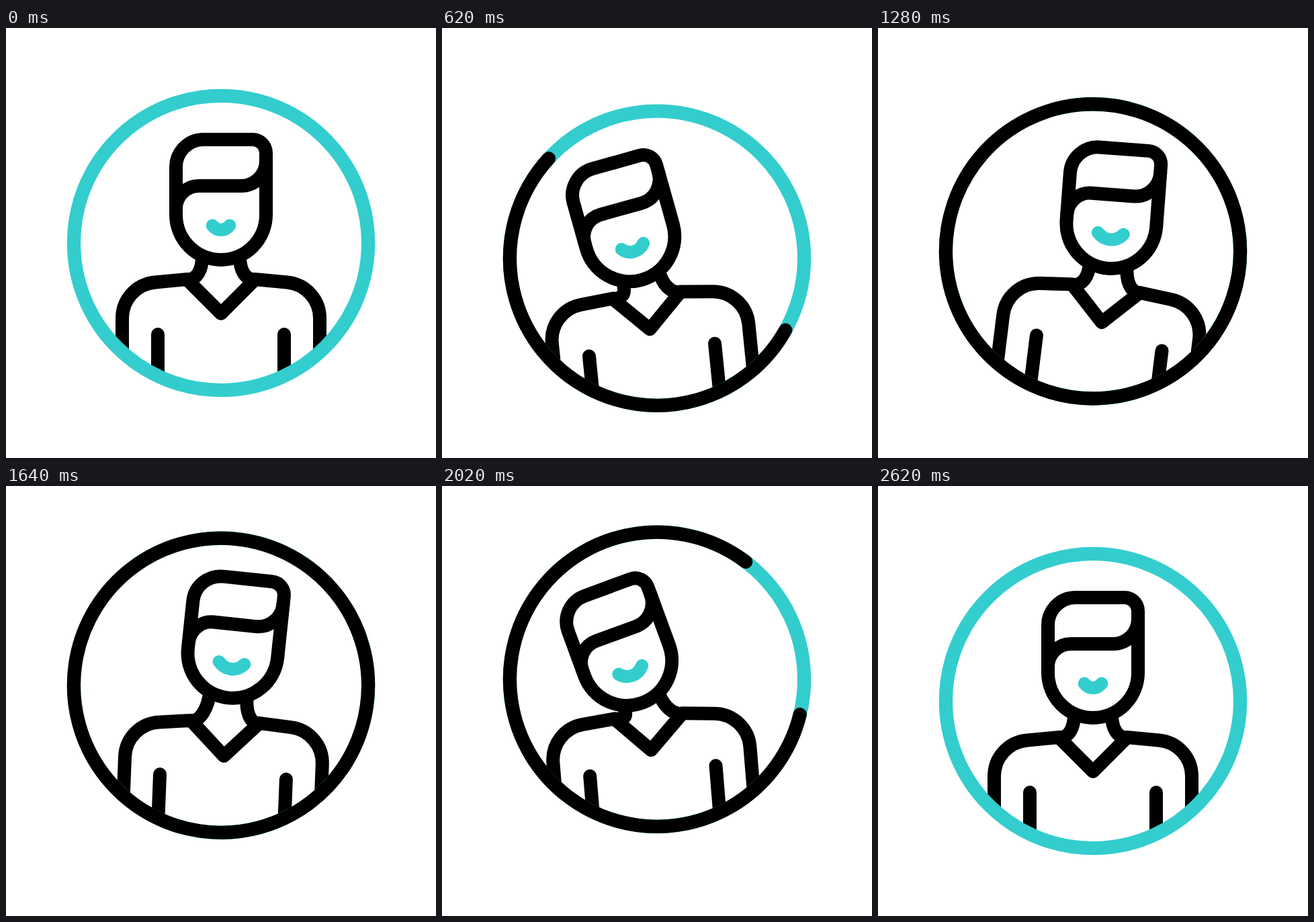
Recreate the animation shown at these times as an HTML page. Size 640x640 px, loop 3000 ms.

```html
<!DOCTYPE html>
<html lang="en">
<head>
<meta charset="utf-8">
<title>Avatar</title>
<style>
  html, body { margin: 0; width: 100%; height: 100%; overflow: hidden; background: #fff; }
  svg { display: block; width: 100vw; height: 100vh; }
  .line { fill: none; stroke: #000; stroke-width: 20; stroke-linecap: round; stroke-linejoin: round; }
  .ring { fill: none; stroke: #33cdce; stroke-width: 20.3; }
  #mouth { stroke: #33cdce; stroke-width: 19; }
  #trace { stroke: #000; stroke-linecap: round; }
</style>
</head>
<body>
<svg viewBox="0 0 640 640">
  <defs>
    <clipPath id="inside"><circle cx="320" cy="320" r="219"/></clipPath>
  </defs>
  <g id="all">
    <g clip-path="url(#inside)">
      <g id="body" class="line">
        <path d="M173 510V432C173 404 194 381 222 378.500L270 374"/>
        <path d="M467 510V432C467 404 446 381 418 378.500L370 374"/>
        <path d="M270 375L320 425L370 375"/>
        <path d="M226 456V550M414 456V550"/>
        <path id="neck"/>
        <g id="head">
          <path d="M253 278V207A41 41 0 0 1 294 166H367A20 20 0 0 1 387 186V278A67 67 0 0 1 253 278Z"/>
          <path d="M253 269A34 34 0 0 1 287 235H350A37 37 0 0 0 387 198"/>
          <path id="mouth"/>
        </g>
      </g>
    </g>
    <circle class="ring" cx="320" cy="320" r="219.100"/>
    <circle id="trace" class="ring" cx="320" cy="320" r="219.100" pathLength="360"/>
  </g>
</svg>
<script>
const LOOP = 3000, STEP = 20;
const $ = id => document.getElementById(id);
const set = (id, name, value) => $(id).setAttribute(name, value);

function ease(t, from, to) {
  const p = Math.min(1, Math.max(0, (t - from) / (to - from)));
  return p * p * (3 - 2 * p);
}

// Eased value through the given times, starting and ending at rest
function track(t, times, values) {
  let v = values[0];
  for (let i = 1; i < times.length; i++) {
    v += (values[i] - values[i - 1]) * ease(t, times[i - 1], times[i]);
  }
  return v;
}

const SHIFT = [200, 900, 1900, 2600];
const SWAY = [200, 800, 1300, 2080, 2600];
const NOD = [200, 900, 1560, 2060, 2600];

function neckSide(side, headPoint) {
  const [x0, y0] = headPoint(side * 28, 62);
  const [x1, y1] = headPoint(side * 28, 83);
  return `M${x0} ${y0}C${x1} ${y1} ${320 + side * 36} 374 ${320 + side * 50} 375`;
}

function draw(t) {
  set('all', 'transform', `translate(0 ${track(t, SHIFT, [0, 35, -35, 0])})`);
  set('body', 'transform', `rotate(${track(t, SWAY, [0, -7.3, 7.1, -4.9, 0])} 320 531)`);

  const tilt = track(t, NOD, [0, -15.3, 5.2, -15.8, 0]);
  const hx = 320 + track(t, NOD, [0, -25, 9.8, -25.8, 0]);
  const hy = 278 + track(t, NOD, [0, 10.4, -7.8, 11.5, 0]);
  set('head', 'transform', `translate(${hx} ${hy}) rotate(${tilt}) translate(-320 -278)`);

  const c = Math.cos(tilt * Math.PI / 180), s = Math.sin(tilt * Math.PI / 180);
  const headPoint = (x, y) => [hx + x * c - y * s, hy + x * s + y * c];
  set('neck', 'd', neckSide(-1, headPoint) + neckSide(1, headPoint));

  const smile = track(t, SHIFT, [0, 1, 1, 0]);
  const w = 12.8 + 6.2 * smile, y = 294 - 1.2 * smile, low = 302.7 + 2.3 * smile;
  set('mouth', 'd', `M${320 - w} ${y}C${320 - w * 0.45} ${low} ${320 + w * 0.45} ${low} ${320 + w} ${y}`);

  const start = 360 * ease(t, 1800, 2600);
  const end = 360 * ease(t, 200, 1000);
  set('trace', 'visibility', t > 200 && t < 2610 ? 'visible' : 'hidden');
  set('trace', 'stroke-dasharray', `${end - start} 400`);
  set('trace', 'stroke-dashoffset', -start);
  set('trace', 'transform', `rotate(${360 * ease(t, 200, 2600)} 320 320)`);
}

const begin = performance.now();
function tick() {
  const t = (performance.now() - begin) % LOOP;
  draw(Math.floor(t / STEP) * STEP);
  requestAnimationFrame(tick);
}
tick();
</script>
</body>
</html>
```
